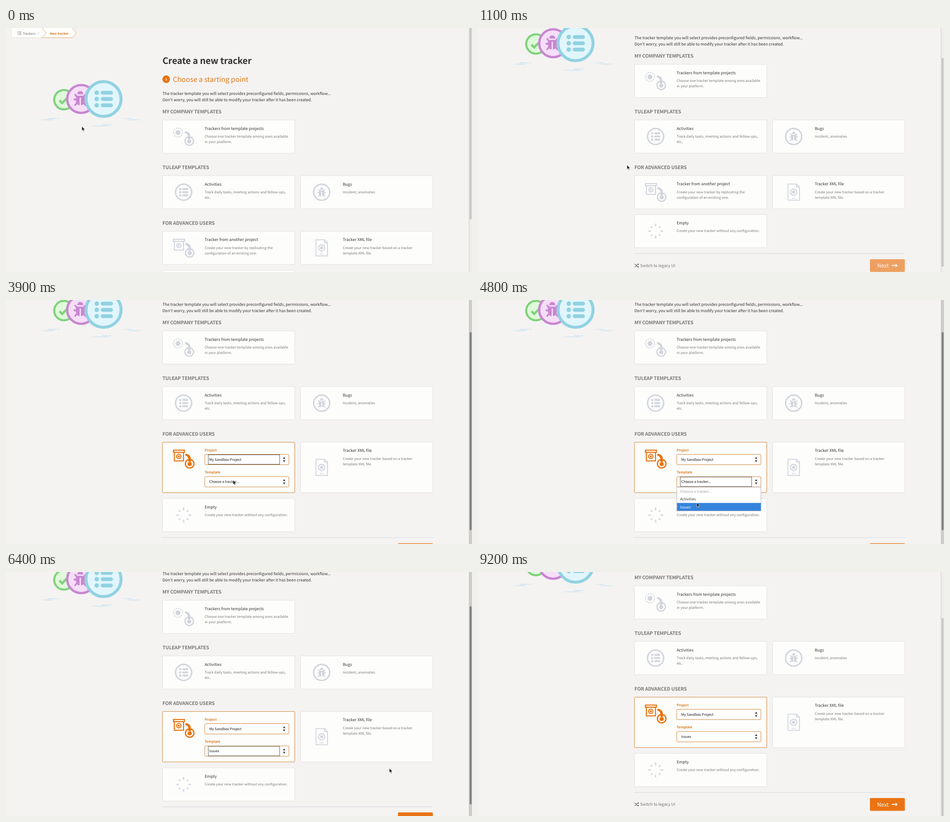
Animation of 1032x543 px, one loop 9300 ms. Source, as an HTML page:

```html
<!DOCTYPE html>
<html lang="en">
<head>
<meta charset="utf-8">
<title>Create a new tracker</title>
<style>
html, body { margin: 0; width: 100%; height: 100%; overflow: hidden; background: #f4f3f2; }
svg { display: block; width: 1032px; height: 543px; }
text {
  font: 8.87px "Noto Sans CJK SC", "Noto Sans CJK JP", "Noto Sans CJK KR", "Noto Sans", sans-serif;
  fill: #333231; white-space: pre; text-rendering: geometricPrecision;
}
text.semi { font-weight: 700; letter-spacing: -.013em; }
text.title { font-size: 19.8px; letter-spacing: -.006em; fill: #343332; }
text.step { font-size: 15.53px; fill: #e07818; }
text.section { font-size: 10.7px; fill: #7b7975; }
text.desc { font-size: 7.79px; fill: #7b7977; }
text.crumb { font-size: 7.15px; fill: #6f6d6b; }
text.label { font-size: 7.73px; fill: #d9822b; }
text.value { font-size: 7.78px; fill: #111; }
text.option { font-size: 8.25px; fill: #333; }
text.next { font-size: 12.1px; fill: #fff; }
text.num { font-size: 7.7px; fill: #fff; text-anchor: middle; }
.card { fill: #fdfdfc; stroke: #e3e1df; }
.card.on { stroke: #cf8436; }
.icon { color: #d2d5de; }
.icon.on { color: #e8730f; }
.select { fill: #fff; stroke: #cf8436; }
.focus { fill: none; stroke: #555; }
.line { fill: none; stroke: currentColor; }
.fill { fill: currentColor; }
</style>
</head>
<body>
<svg id="stage" viewBox="0 0 1032 543"></svg>
<script>
const LOOP = 9300, ROW = 17.4, GROWTH = 38.6;
const PROJECT = 'My Sandbox Project';
const PROJECTS = ['Choose a project...', 'Access Requests', 'Agile Planning', 'Archive', 'Backlog',
  'Build Tools', 'Customer Support', 'Design Reviews', 'Documentation', 'Experiments', 'Feedback',
  'Hardware Lab', 'Infrastructure', 'Internal Tools', 'Knowledge Base', 'Maintenance', PROJECT];
const TRACKERS = ['Choose a tracker...', 'Activities', 'Issues'];

const text = (x, y, str, cls = '') => `<text x="${x}" y="${y}" class="${cls}">${str}</text>`;
const group = (x, y, body, attrs = '') => `<g transform="translate(${x} ${y})" ${attrs}>${body}</g>`;
const ring = (x, y, r, w) => `<circle class="line" cx="${x}" cy="${y}" r="${r}" stroke-width="${w}"/>`;
const dot = (x, y, r) => `<circle class="fill" cx="${x}" cy="${y}" r="${r}"/>`;
const line = (d, w, attrs = '') => `<path class="line" d="${d}" stroke-width="${w}" ${attrs}/>`;
const shape = (d, attrs = '') => `<path class="fill" d="${d}" ${attrs}/>`;
const box = (x, y, w, h, cls, rx = 1.5) =>
  `<rect x="${x}" y="${y}" width="${w}" height="${h}" rx="${rx}" class="${cls}"/>`;

// Icons, centred on their own origin
const list = s => `<g transform="scale(${s})">` + [-14, 0, 14].map(y =>
  dot(-15, y, 5) + line(`M-2 ${y}H16.5`, 8.6, 'stroke-linecap="round"')).join('') + '</g>';
const bugHalf = shape('M.1-3.75H-5.2Q-6.5-3.5-6.5-2V2.5C-6.5 6-4.4 8.75-.95 8.75V-1.25H.1Z') +
  line('M-4.8-2.3-7.6-5.1M-6 1.25H-8.8M-4.8 5.6-7.6 8.6', 2.4, 'stroke-linecap="round"');
const bug = s => `<g transform="scale(${s * .92} ${s * 1.04})">${shape('M-4.4-5.6a4.4 4.4 0 0 1 8.8 0Z')}${bugHalf}<g transform="scale(-1 1)">${bugHalf}</g></g>`;
const badge = glyph => ring(0, 0, 17.8, 3.2) + glyph;
const copyArrow = ring(12.5, 10, 9.4, 2.8) + dot(12.5, 10.6, 4.7) +
  shape('M5.4 .2H9.6C9.6-4 7.4-7.2 2.8-7.8V-12C10.6-12.2 15.2-7.4 15.4 .2H19.4L12.5 7.4Z',
    'stroke="#fdfdfc" stroke-width="1" paint-order="stroke"');
const templateIcon = line('M-22.5-9a10 10 0 1 1 20 0a10 10 0 1 1-20 0', 2, 'stroke-dasharray="3.2 2.03"') +
  dot(-12.5, -9, 5.5) + copyArrow;
const projectIcon = line('M-22.5-19.2H1.8V-14.4H-22.5ZM-20.5-14.4V4.8H-.2V-14.4', 2.3) +
  ring(-10.6, -5.4, 4.9, 2.2) + dot(-10.6, -5.4, 2.2) + group(1, 1, copyArrow);
const fileIcon = line('M-12.6-18.2H6.2L12.8-11.6V18H-12.6ZM6.2-18V-11.6H12.6', 2) +
  ring(0, 0, 7, 2.2) + dot(0, 0, 3.5) +
  '<text x="0" y="15.4" text-anchor="middle" style="font-size:4.6px;font-weight:700;fill:currentColor">XML</text>';
const spinner = [...Array(8)].map((_, i) =>
  line(`M0-10.4V-${i % 2 ? 15 : 16.6}`, 2.7, `transform="rotate(${i * 45})"`)).join('');

const icon = (x, y, body, cls = '') => group(x, y, body, `class="icon ${cls}"`);
const card = (x, y, glyph, title, lines, h = 73.7) => box(x, y, 293, h, 'card') +
  icon(x + 46.8, y + h / 2, glyph) + text(x + 93.4, y + 21.9, title) +
  lines.map((l, i) => text(x + 93.4, y + 39.2 + i * 12.4, l, 'desc')).join('');

const select = (y, label, id) => text(440, y - 6.9, label, 'label semi') +
  box(440.2, y, 186.4, 23, 'select', 2) +
  `<text id="${id}" x="450" y="${y + 14.1}" class="value"></text>` +
  `<path fill="#444" d="M613.2 ${y + 10}h5.6l-2.8-4.4ZM613.2 ${y + 13}h5.6l-2.8 4.4Z"/>` +
  `<rect id="${id}Focus" class="focus" x="448" y="${y + 1}" width="158" height="21"/>`;
const popup = (id, y, options) => `<g id="${id}">` +
  `<rect x="440.3" y="${y}" width="186.4" height="${options.length * ROW + .6}" fill="#fff" stroke="#b5b2af"/>` +
  `<rect id="${id}Mark" x="440.8" width="185.6" height="${ROW}" fill="#3584dc"/>` +
  options.map((o, i) => `<text x="447.5" y="${y + 12.3 + i * ROW}" class="option"${i ? '' : ' style="fill:#a5a3a1"'}>${o}</text>`).join('') + '</g>';

const medal = (x, y, r, w, edge, fill, glyph) => group(x, y,
  `<circle r="${r}" fill="${fill}" stroke="${edge}" stroke-width="${w}"/>` + glyph, `style="color:${edge}"`);
const art =
  `<path fill="none" stroke="#cbe4f0" stroke-width="1.6" d="M92 201.4h20m2 0h4M80 204.4h3m2 0h20M262 201.4h4m2 0h10M272 204.4h4m2 0h12m2 0h5M212 215.4h14m2 0h5M190 218.2h4m2 0h26m2 0h4"/>` +
  medal(128.3, 159.6, 21.6, 4.6, '#80d27c', '#dffadb', line('M-10 1.5-4 7.5 8-4.5', 5)) +
  medal(166.5, 158, 31, 5.2, '#c987d0', '#f6def9', group(-2, -1, bug(1.62))) +
  medal(216, 158, 38.8, 6.6, '#92d2e1', '#e1f6fc', list(1));

const crumbs = `<g fill="#fdfdfc">
  <path d="M11.5-1V21.7H80L89.5 11 80-1Z" stroke="#e0dedc"/>
  <path d="M79.5-.5 89 11 79.5 21.7H146.5L156 11 146.5-.5Z" stroke="#e5a565"/></g>
  <path d="M28.5 8.5h5M28.5 11.5h5M28.5 14.5h5M26 7.4v2.2M25.6 11.5h1.4M25.6 14.5h1.4" stroke="#6f6d6b" stroke-width="1.2"/>
  <path d="M71 10.8h3.4l-1.7 1.9Z" fill="#b5b3b1"/>` +
  text(37.4, 14.5, 'Trackers', 'crumb') + `<text x="97" y="14.5" class="crumb semi" style="fill:#dd7b20">New tracker</text>`;

const xmlLines = ['Create your new tracker based on a tracker', 'template XML file.'];
const page = crumbs + art +
  text(346.5, 79.7, 'Create a new tracker', 'semi title') +
  '<circle cx="354.8" cy="114" r="8.4" fill="#e8730f"/>' + text(354.8, 116.8, '1', 'num semi') +
  text(369.5, 119.8, 'Choose a starting point', 'step') +
  text(346.5, 148.6, 'The tracker template you will select provides preconfigured fields, permissions, workflow...') +
  text(346.5, 163.4, "Don't worry, you will still be able to modify your tracker after it has been created.") +
  ['MY COMPANY', 'TULEAP', 'FOR ADVANCED'].map((s, i) =>
    text(346.5, 190 + i * 123.9, s + (i < 2 ? ' TEMPLATES' : ' USERS'), 'section semi')).join('') +
  card(346.5, 204.8, templateIcon, 'Trackers from template projects',
    ['Choose one tracker template among ones available', 'in your platform.']) +
  card(346.5, 328.6, badge(list(.5)), 'Activities', ['Track daily tasks, meeting actions and follow-ups,', 'etc.']) +
  card(652.3, 328.6, badge(bug(1)), 'Bugs', ['Incident, anomalies']) +
  '<g id="closed">' + card(346.5, 452.5, projectIcon, 'Tracker from another project',
    ['Create your new tracker by replicating the', 'configuration of an existing one.']) +
  card(652.3, 452.5, fileIcon, 'Tracker XML file', xmlLines) + '</g>' +
  '<g id="open">' + box(346.5, 452.5, 293, 112.2, 'card on') + icon(393.3, 489.4, projectIcon, 'on') +
  card(652.3, 452.5, fileIcon, 'Tracker XML file', xmlLines, 112.2) +
  select(479.5, 'Project', 'project') + `<g id="second">${select(529, 'Template', 'tracker')}</g></g>` +
  '<g id="rest">' + card(346.5, 539.2, spinner, 'Empty', ['Create your new tracker without any configuration.']) +
  '<path d="M346.5 626H945.5" stroke="#d6d9de"/>' +
  group(346.5, 652.6, line('M0-2.7H2L6.5 2.7H8.5M0 2.7H2L6.5-2.7H8.5', 1.3) + shape('M7.6-5 10.2-2.7 7.6-.4ZM7.6 .4 10.2 2.7 7.6 5Z'), 'style="color:#75736f"') +
  `<text x="359" y="655.8" style="fill:#75736f">Switch to legacy UI</text>` +
  '<g id="next"><rect x="868" y="638.4" width="77.3" height="28.4" rx="2"/>' + text(884, 657.2, 'Next', 'next') +
  group(916, 652.6, line('M0 0H10', 2) + shape('M8.6-4 13.4 0 8.6 4Z'), 'style="color:#fff"') + '</g></g>' +
  popup('projects', 182.6, PROJECTS) + popup('trackers', 552.5, TRACKERS);

const stage = document.getElementById('stage');
stage.innerHTML = `<rect width="1032" height="543" fill="#f4f3f2"/><g id="page">${page}</g>
  <rect id="track" x="1025" width="7" height="543"/><path d="M1025.5 0V543" stroke="#cdcac7"/>
  <rect id="thumb" x="1026.8" width="4.2" rx="2.1"/>
  <path id="cursor" d="M0 0V9.6L2.2 7.6 3.9 11.2 5.4 10.5 3.8 7 6.8 6.8Z" fill="#1c1c1c" stroke="#fff" stroke-width=".6"/>`;
const ui = Object.fromEntries([...stage.querySelectorAll('[id]')].map(e => [e.id, e]));

const SCROLL = [[0, 0], [400, 0], [500, 14], [600, 58], [700, 97], [800, 104], [900, 104], [1000, 112],
  [1100, 124], [1200, 133], [1300, 136], [6200, 136], [6300, 138], [6400, 142], [6500, 146], [6600, 146],
  [6700, 152], [6800, 164], [6900, 172], [7000, 174]];
const POINTER = [[0, 168, 219], [200, 170, 220.5], [400, 170, 220.5], [700, 184, 241], [800, 188, 245],
  [900, 188, 245], [1000, 215, 262], [1200, 445, 348], [1300, 473, 353.5], [1900, 473, 353.5],
  [2100, 479.5, 354], [2600, 479.5, 354], [2800, 484, 343], [2900, 484, 343], [3100, 484, 337],
  [3500, 484, 337], [3900, 503, 401], [4200, 503, 401], [4600, 486.5, 453], [4700, 486.5, 453],
  [4800, 484.5, 451], [5300, 484.5, 451], [5700, 640, 452], [6000, 820, 442], [6200, 849, 437],
  [6600, 849, 437], [7000, 917, 524], [7400, 917, 524], [7500, 919, 525], [8000, 919, 525],
  [8100, 850, 480], [8400, 60, 80]];

function sample(keys, t) {
  const next = keys.findIndex(k => k[0] > t);
  if (next < 0) return keys[keys.length - 1].slice(1);
  const [a, b] = [keys[next - 1], keys[next]];
  const p = (t - a[0]) / (b[0] - a[0]);
  return a.slice(1).map((v, i) => v + (b[i + 1] - v) * p);
}
const show = (el, on) => el.setAttribute('visibility', on ? 'inherit' : 'hidden');
const move = (el, x, y) => el.setAttribute('transform', `translate(${x} ${y})`);

function mark(name, y, row) {
  show(ui[name + 'Mark'], row > 0);
  ui[name + 'Mark'].setAttribute('y', y + .3 + row * ROW);
  ui[name].querySelectorAll('text').forEach((e, i) => { if (i) e.style.fill = i === row ? '#fff' : ''; });
}

function draw(time) {
  const t = Math.floor(time / 100) * 100;   // the picture advances ten times a second
  const between = (a, b) => t >= a && t < b;
  const [scroll] = sample(SCROLL, t), [x, y] = sample(POINTER, t);
  const open = t >= 1700, active = between(1500, 9200), ready = t >= 5300;

  move(ui.page, 0, -scroll);
  move(ui.rest, 0, open ? GROWTH : 0);
  move(ui.cursor, x, y);
  show(ui.cursor, t < 8500);
  show(ui.closed, !open);
  show(ui.open, open);

  ui.project.textContent = t < 3300 ? 'Choose a project...' : PROJECT;
  ui.tracker.textContent = ready ? 'Issues' : 'Choose a tracker...';
  ui.second.setAttribute('opacity', t < 3300 ? .45 : 1);
  show(ui.projectFocus, open && between(2500, 4000));
  show(ui.trackerFocus, open && between(4000, 9200));
  show(ui.projects, between(2500, 3300));
  show(ui.trackers, between(4000, 5300));
  if (between(2500, 3300)) mark('projects', 182.6, t < 3000 ? 0 : 16);
  else show(ui.projectsMark, false);
  if (between(4000, 5300)) mark('trackers', 552.5, t < 4400 ? 0 : t < 4600 ? 1 : 2);
  else show(ui.trackersMark, false);

  ui.next.setAttribute('opacity', ready ? 1 : .65);
  ui.next.setAttribute('fill', between(7000, 8100) ? '#e06c0f' : '#ea7414');
  ui.track.setAttribute('fill', active ? '#cecdcb' : '#efeeed');
  ui.thumb.setAttribute('fill', active ? '#7e8081' : '#c6c6c5');
  ui.thumb.setAttribute('y', -39 + scroll * (open ? .812 : .85));
  ui.thumb.setAttribute('height', open ? 441 : 465);
}

let start;
function tick(now) {
  start ??= now;
  draw((now - start) % LOOP);
  requestAnimationFrame(tick);
}
draw(0);
requestAnimationFrame(tick);
</script>
</body>
</html>
```
